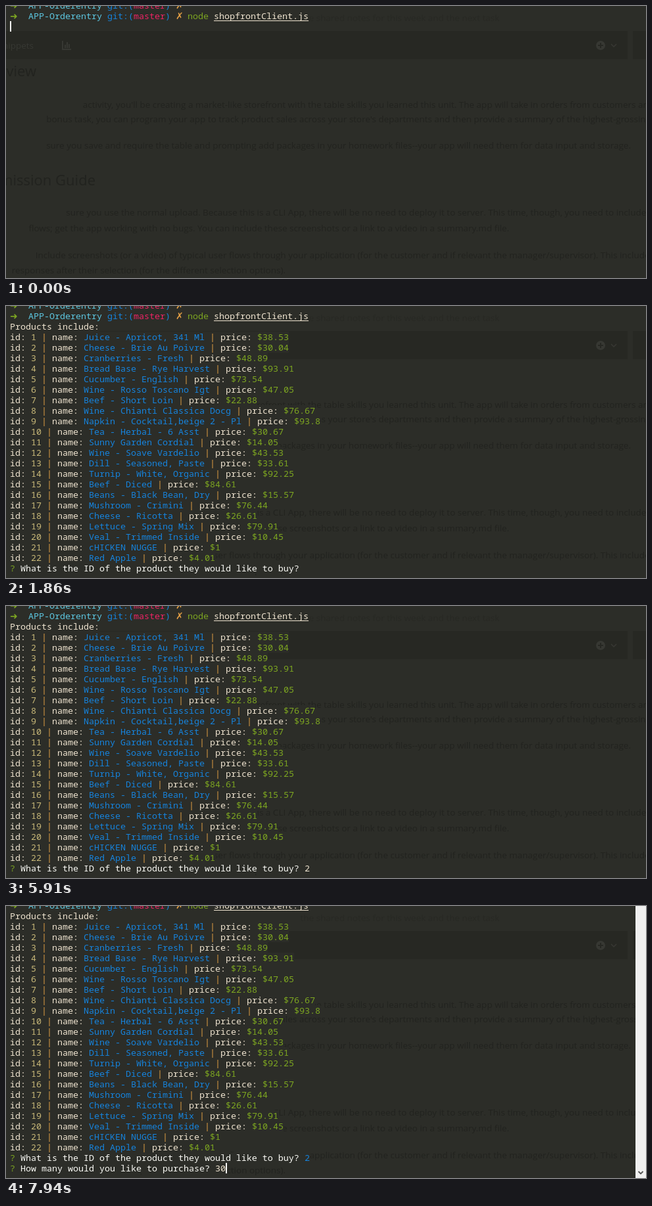
Recreate the animation shown at these times as an HTML page with a canvas. Size 973 by 414 pixels, loop 8000 ms.

```html
<!DOCTYPE html>
<html lang="en">
<head>
<meta charset="utf-8">
<title>Storefront terminal</title>
<style>
html, body { margin: 0; width: 100%; height: 100%; overflow: hidden; background: #2c2d28; }
canvas { display: block; }
</style>
</head>
<body>
<canvas id="stage" width="973" height="414"></canvas>
<script>
const ctx = document.getElementById('stage').getContext('2d');
const LOOP = 8000, LEFT = 6, CELL = 8, ROW = 16;
const MONO = '13.333px "Noto Sans Mono", "DejaVu Sans Mono", monospace';
const SYMBOL = '14px "DejaVu Sans", sans-serif';
const BG = '#2c2d28', SHADE = '#272823', GHOST = '#22231f';
const CREAM = '#eee3cf', ORANGE = '#e5a045', TAN = '#c8b878', BLUE = '#1683dc',
      GREEN = '#7da621', CYAN = '#5cc6e0', PINK = '#ee2364', WHITE = '#fbfbf6';

// The cursor starts visible and flips at each of these times.
const BLINKS = [780, 1330, 1860, 2400, 2870, 3420, 3970, 4520, 4980,
                5360, 5910, 5990, 6540, 7070, 7620, 7940];

const PRODUCTS = `Juice - Apricot, 341 Ml|38.53
Cheese - Brie Au Poivre|30.04
Cranberries - Fresh|48.89
Bread Base - Rye Harvest|93.91
Cucumber - English|73.54
Wine - Rosso Toscano Igt|47.05
Beef - Short Loin|22.88
Wine - Chianti Classica Docg|76.67
Napkin - Cocktail,beige 2 - Pl|93.8
Tea - Herbal - 6 Asst|30.67
Sunny Garden Cordial|14.05
Wine - Soave Vardelio|43.53
Dill - Seasoned, Paste|33.61
Turnip - White, Organic|92.25
Beef - Diced|84.61
Beans - Black Bean, Dry|15.57
Mushroom - Crimini|76.44
Cheese - Ricotta|26.61
Lettuce - Spring Mix|79.91
Veal - Trimmed Inside|10.45
cHICKEN NUGGE|1
Red Apple|4.01`.split('\n').map(line => line.split('|'));

// A row is a list of [text, colour, optional x].
const prompt = [['➜', GREEN, 6], ['APP-Orderentry', CYAN, 34], [' git:(', BLUE],
                ['master', PINK], [')', BLUE], ['✗', ORANGE, 258]];
const command = [...prompt, ['node', GREEN, 276], ['shopfrontClient.js', CREAM, 316]];

function productRow([name, price], i) {
  return [['id: ', CREAM], [String(i + 1), TAN], [' | ', ORANGE], ['name: ', CREAM],
          [name, BLUE], [' | ', ORANGE], ['price: ', CREAM], ['$' + price, GREEN]];
}
const productRows = PRODUCTS.map(productRow);
const question = (text, answer, color) => [['? ', GREEN], [text + ' ', WHITE], [answer, color]];

function rowsAt(t) {
  const rows = [prompt, command];
  if (t < 150) return rows;
  rows.push([['Products include:', CREAM]]);
  if (t < 240) return rows.concat(productRows.slice(0, 19), [productRows[19].slice(0, 5)]);
  rows.push(...productRows);
  const done = t >= 5990;
  rows.push(question('What is the ID of the product they would like to buy?',
                     t >= 5360 ? '2' : '', done ? BLUE : CREAM));
  if (done) rows.push(question('How many would you like to purchase?', t >= 7940 ? '30' : '', CREAM));
  return rows;
}

function cursorAt(t) {
  if (t < 150) return [0, 23];
  if (t < 240) return [45, 327];
  if (t < 5990) return [t < 5360 ? 56 : 57, 391];
  return [t < 7940 ? 39 : 41, 391];
}

function rect(color, x, y, w, h) {
  ctx.fillStyle = color;
  ctx.fillRect(x, y, w, h);
}

function write(text, x, y, color, font, align = 'left') {
  ctx.font = font;
  ctx.fillStyle = color;
  ctx.textAlign = align;
  ctx.fillText(text, x, y);
}

function polyline(color, width, ...points) {
  ctx.strokeStyle = color;
  ctx.lineWidth = width;
  ctx.beginPath();
  points.forEach(([x, y]) => ctx.lineTo(x, y));
  ctx.stroke();
}

// The page that shows dimly through the terminal window.
function drawPage() {
  const sans = size => size + 'px "Open Sans", "Noto Sans", sans-serif';
  const body = sans(13.5), faint = '#373833';
  rect(SHADE, 0, 38, 945, 43);
  rect(SHADE, 953, 38, 20, 43);
  write('the shared notes for this week and the next task', 750, 23, '#282924', body, 'right');
  write('Snippets', 42, 65, faint, body, 'right');
  polyline(faint, 2, [86, 53], [86, 66], [99, 66]);
  [5, 9, 6].forEach((h, i) => rect(faint, 89 + i * 3, 64 - h, 2, h));
  ctx.fillStyle = faint;
  ctx.beginPath();
  ctx.arc(904, 60, 7, 0, 7);
  ctx.fill();
  rect(SHADE, 900, 59, 8, 2);
  rect(SHADE, 903, 56, 2, 8);
  polyline(faint, 1.5, [920, 58], [924, 62], [928, 58]);

  write('Overview', 46, 107, GHOST, sans(22), 'right');
  write('Submission Guide', 136, 273, GHOST, sans(22), 'right');
  const lines = [
    [155, 985, "activity, you'll be creating a market-like storefront with the table skills you learned this unit. The app will take in orders from customers and"],
    [177, 980, "bonus task, you can program your app to track product sales across your store's departments and then provide a summary of the highest-grossing"],
    [217, 950, 'sure you save and require the table and prompting add packages in your homework files--your app will need them for data input and storage.'],
    [319, 985, 'sure you use the normal upload. Because this is a CLI App, there will be no need to deploy it to server. This time, though, you need to include it'],
    [343, 765, 'flows; get the app working with no bugs. You can include these screenshots or a link to a video in a summary.md file.'],
    [384, 985, 'Include screenshots (or a video) of typical user flows through your application (for the customer and if relevant the manager/supervisor). This includes'],
    [407, 425, 'responses after their selection (for the different selection options).']
  ];
  for (const [y, end, text] of lines) write(text, end, y, GHOST, body, 'right');
}

function drawRow(row, top) {
  // Lay the pieces out first, since written cells hide the page behind them.
  let end = LEFT;
  const pieces = row.map(([text, color, x = end]) => {
    end = x + text.length * CELL;
    return { text, color, x };
  });
  rect(BG, 0, top, end, ROW);
  for (const { text, color, x } of pieces) {
    write(text, x, top + 13, color, /[➜✗]/.test(text) ? SYMBOL : MONO);
  }
  if (row === command) rect(CREAM, 316, top + 15, 144, 1);
}

function draw(now) {
  const t = now % LOOP;
  const shift = t >= 5990 ? ROW : 0;
  rect(BG, 0, 0, 973, 414);
  drawPage();
  rowsAt(t).forEach((row, i) => drawRow(row, i * ROW - 9 - shift));
  if (BLINKS.filter(b => b <= t).length % 2 === 0) {
    const [col, y] = cursorAt(t);
    rect(WHITE, LEFT + col * CELL, y, 2, ROW);
  }
  if (t >= 6080) {
    rect('#f0f0f0', 957, 0, 16, 414);
    polyline('#505050', 1.8, [961.5, 404], [965, 407.5], [968.5, 404]);
  }
  requestAnimationFrame(draw);
}
requestAnimationFrame(draw);
</script>
</body>
</html>
```
